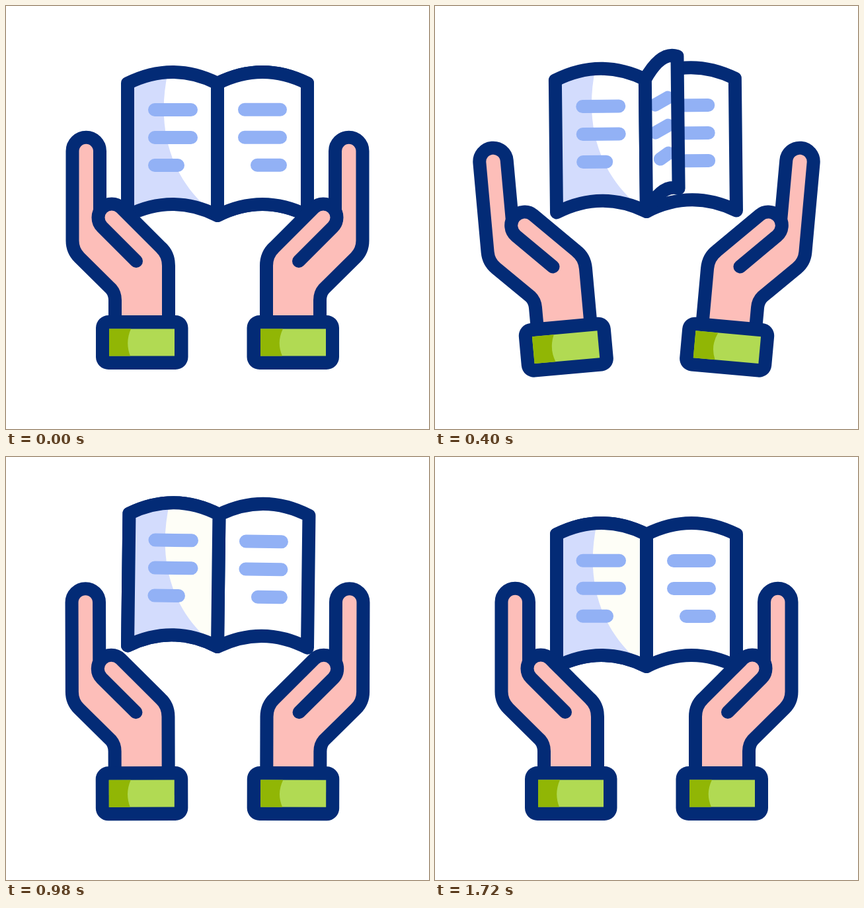
An HTML page that plays this animation: 640x640 px, repeating every 1820 ms.

```html
<!DOCTYPE html>
<html lang="en">
<head>
<meta charset="utf-8">
<title>Book and hands</title>
<style>
  html, body { margin: 0; width: 100%; height: 100%; overflow: hidden; background: #fff; }
  svg { display: block; width: 100vw; height: 100vh; }
  .ink { fill: none; stroke: #032b76; stroke-width: 20; stroke-linecap: round; stroke-linejoin: round; }
  .text { fill: none; stroke: #92b1f5; stroke-width: 20; stroke-linecap: round; }
  .shade { fill: #d3dcfd; }
  .navy { fill: #032b76; }
  .skin { fill: #fdbeb9; }
  .green { fill: #b1da53; }
  .dark { fill: #91b605; }
</style>
</head>
<body>
<svg viewBox="0 0 640 640">
  <defs>
    <g id="hand">
      <path class="skin" d="M142 310V219.500A20.700 20.700 0 0 0 100.500 219.500V355Q100.500 370 111 380.500L159 428Q165 435 165 445V480H246V393Q246 376 234.500 365.500L174.500 305.500A20.500 20.500 0 0 0 145.500 334.500Z"/>
      <path class="ink" d="M142 310V219.500A20.700 20.700 0 0 0 100.500 219.500V355Q100.500 370 111 380.500L159 428Q165 435 165 445V480M246 480V393Q246 376 234.500 365.500L174.500 305.500A20.500 20.500 0 0 0 145.500 334.500L197 386"/>
      <rect class="navy" x="136" y="468" width="139.500" height="82" rx="19"/>
      <rect class="green" x="156" y="488.500" width="99" height="41"/>
    </g>
    <path id="shade" class="shade" d="M-136 -200Q-104 -216 -75 -217C-92 -140 -76 -60 -8 -5L0 0Q-68 -34 -136 0Z"/>
  </defs>

  <g id="book">
    <path fill="#fff" d="M-136 -200Q-68 -234 0 -200Q68 -234 136 -200V0Q68 -34 0 0Q-68 -34 -136 0Z"/>
    <use href="#shade"/>
    <path class="text" d="M-95 -160H-40M-95 -118H-40M-95 -76H-60M41 -160H95M41 -118H95M60 -76H95"/>
    <path class="ink" d="M-136 -200Q-68 -234 0 -200Q68 -234 136 -200V0Q68 -34 0 0Q-68 -34 -136 0ZM0 -200V0"/>
    <path id="leaf"/>
    <use id="leafShade" href="#shade"/>
    <path id="leafText" class="text"/>
    <path id="leafEdge" class="ink"/>
  </g>

  <g class="arm">
    <use href="#hand"/>
    <path class="dark" d="M156 488.500H189Q180 509 188 529.500H156Z"/>
  </g>
  <g transform="translate(640) scale(-1 1)">
    <g class="arm">
      <use href="#hand"/>
      <path class="dark" d="M255 488.500H221Q231 509 222 529.500H255Z"/>
    </g>
  </g>
</svg>

<script>
const LOOP = 1820;
const $ = id => document.getElementById(id);
const arms = document.querySelectorAll('.arm');

// Smooth monotone curve through [time, value] keys, held at both ends.
function track(keys) {
  const last = keys.length - 1;
  const rise = i => (keys[i + 1][1] - keys[i][1]) / (keys[i + 1][0] - keys[i][0]);
  const slopes = keys.map((_, i) => {
    if (i === 0 || i === last) return 0;
    const a = rise(i - 1), b = rise(i);
    return a * b > 0 ? 2 * a * b / (a + b) : 0;
  });
  return t => {
    if (t <= keys[0][0]) return keys[0][1];
    if (t >= keys[last][0]) return keys[last][1];
    const i = keys.findIndex(k => k[0] > t) - 1;
    const [t0, v0] = keys[i], [t1, v1] = keys[i + 1];
    const d = t1 - t0, u = (t - t0) / d, w = 1 - u;
    return v0 * (1 + 2 * u) * w * w + v1 * u * u * (3 - 2 * u)
      + d * u * w * (slopes[i] * w - slopes[i + 1] * u);
  };
}

const spread = track([[0, 0], [210, 7.9], [260, 7.4], [540, 3.04], [780, 0.92], [980, 0.15], [1160, 0]]);
const tilt = track([[0, 0], [215, 7.3], [260, 6.8], [540, -7.7], [660, -8.8], [780, -8.4],
  [980, 0.7], [1080, 0.9], [1380, 0.45], [1720, 0]]);
const height = track([[0, 0], [260, -2.3], [540, -12], [780, -31], [855, -35.5], [980, -30],
  [1100, -23], [1380, -4], [1720, 0]]);
const turn = track([[160, 1], [260, 0.93], [540, -0.375], [740, -1]]);

// The leaf swings from the right (s = 1) to the left (s = -1), rising on the way.
function drawLeaf(s) {
  const lift = 54 * (1 - Math.abs(s));
  const x = 136 * s, bend = -34 - lift / 4;
  const outline = `M0 -200Q${x / 2} ${bend - 200} ${x} ${-200 - lift}V${-lift}Q${x / 2} ${bend} 0 0Z`;
  const point = (u, y) => `${s * u} ${y - lift * (u / 136) ** 3}`;
  const end = s < 0 ? 96.5 : 95;
  const row = (u, y) => `M${point(u, y)}L${point(end, y)}`;

  $('leaf').setAttribute('d', outline);
  $('leaf').setAttribute('fill', s < 0 ? '#fefef7' : '#fff');
  $('leafEdge').setAttribute('d', outline);
  $('leafText').setAttribute('d', row(41, -160.3) + row(41, -118.3) + row(60, -76.3));
  $('leafShade').setAttribute('opacity', Math.max(0, (-s - 0.4) / 0.6));
  $('leafShade').setAttribute('transform', `scale(${Math.max(0.01, -s)} 1)`);
}

function draw(t) {
  $('book').setAttribute('transform', `translate(320 ${317 + height(t)}) rotate(${tilt(t)})`);
  arms.forEach(arm => arm.setAttribute('transform', `rotate(${-spread(t)} 281.5 595)`));
  drawLeaf(turn(t));
}

const start = performance.now();
function tick() {
  draw((performance.now() - start) % LOOP);
  requestAnimationFrame(tick);
}
tick();
</script>
</body>
</html>
```
